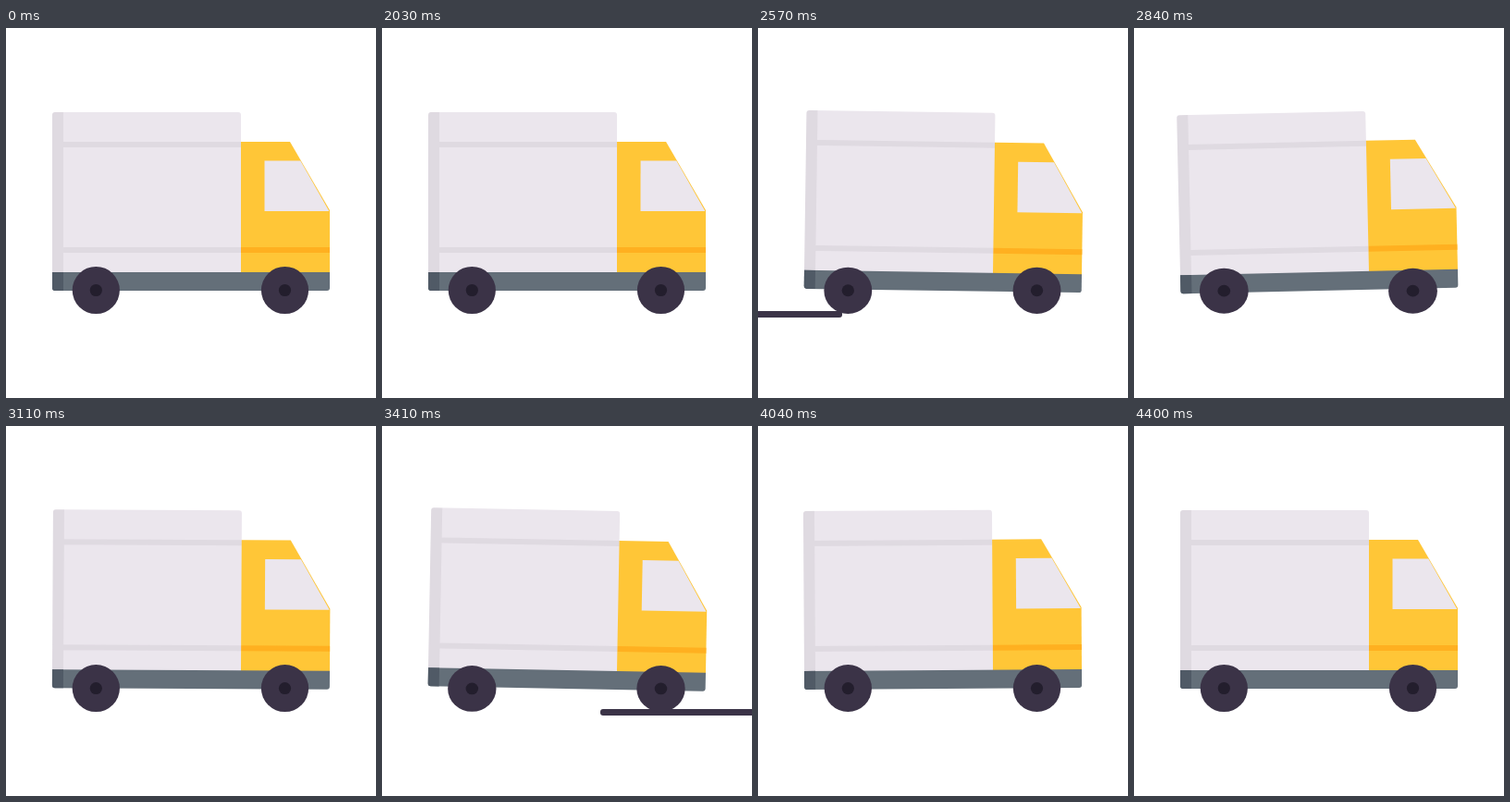
Write an HTML page that moves like this. It is 400 px wide and 400 px high and loops after 4.49 s.

```html
<!DOCTYPE html>
<html lang="en">
<head>
<meta charset="utf-8">
<title>Delivery truck</title>
<style>
  html, body { margin: 0; width: 100%; height: 100%; overflow: hidden; background: #fff; }
  svg { display: block; width: 100%; height: 100%; }
</style>
</head>
<body>
<svg viewBox="0 0 400 400">
  <defs>
    <g id="wheel">
      <circle r="25.6" fill="#3b3347"/>
      <circle r="6.6" fill="#231e2d"/>
    </g>
  </defs>
  <g id="truck">
    <path d="M253 123H307L350 197V265H253Z" fill="#ffc637"/>
    <path d="M279.5 143.5H318.3L349.3 198H279.5Z" fill="#ebe6ed"/>
    <path d="M254 237H350V243H254Z" fill="#ffb020"/>
    <path d="M50 265V94Q50 91 53 91H251Q254 91 254 94V265Z" fill="#ebe6ed"/>
    <path d="M50 264V94Q50 91 53 91H62V264ZM50 123H254V129H50ZM50 237H254V243H50Z"
          fill="#3b3347" fill-opacity=".065"/>
    <path d="M50 264H350V281Q350 284 347 284H53Q50 284 50 281Z" fill="#646f79"/>
    <path d="M50 264H62V284H53Q50 284 50 281Z" fill="#505a66"/>
  </g>
  <rect id="road" y="306" height="7" rx="3" fill="#3b3347"/>
  <use class="wheel" href="#wheel" data-x="97.3"/>
  <use class="wheel" href="#wheel" data-x="301.5"/>
</svg>
<script>
  const LOOP = 4490, START = 2000, STEP = 30;
  const SWING = 435, TILTS = [0, 1.45, -1.3, 1.5, -1.5, 0];
  const ROAD_PERIOD = 1210;

  const truck = document.getElementById('truck');
  const road = document.getElementById('road');
  const wheels = document.querySelectorAll('.wheel');
  const ease = u => u * u * (3 - 2 * u);

  function tiltAt(t) {
    const i = Math.floor(t / SWING);
    if (i >= TILTS.length - 1) return 0;
    return TILTS[i] + (TILTS[i + 1] - TILTS[i]) * ease(t / SWING - i);
  }

  function draw(time) {
    const t = Math.max(0, Math.floor((time % LOOP - START) / STEP) * STEP);
    const tilt = tiltAt(t);
    truck.setAttribute('transform', `rotate(${tilt} 200 264)`);

    // Tyres flatten as the body leans.
    const squash = (tilt / 1.5) ** 2;
    for (const wheel of wheels) {
      wheel.setAttribute('transform',
        `translate(${wheel.dataset.x} ${283.5 + 0.9 * squash}) scale(${1 + 0.045 * squash} ${1 - 0.06 * squash})`);
    }

    // The road streak's front end travels a little faster than its tail.
    const p = t % ROAD_PERIOD;
    const left = 462 - 1.13 * p, right = 661 - p;
    const visible = t > 0 && t < 2 * ROAD_PERIOD && left < 400 && right > 0;
    road.setAttribute('x', left);
    road.setAttribute('width', visible ? right - left : 0);
  }

  function frame() {
    draw(performance.now());
    requestAnimationFrame(frame);
  }
  frame();
</script>
</body>
</html>
```
